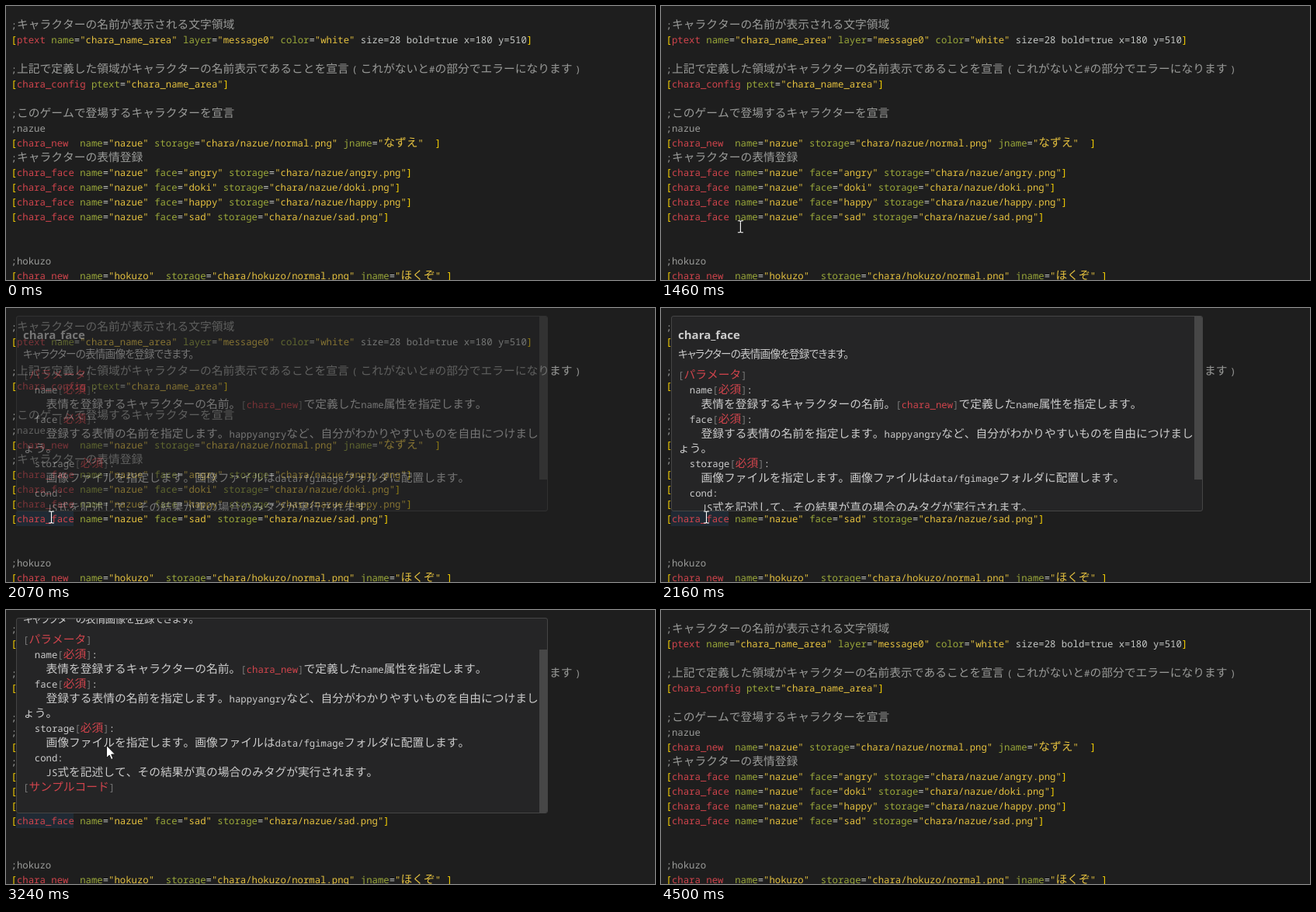
An HTML page that plays this animation: 836 px wide and 353 px high, repeating every 4950 ms.

```html
<!DOCTYPE html>
<html lang="ja">
<head>
<meta charset="utf-8">
<style>
html, body { margin: 0; width: 100%; height: 100%; overflow: hidden; background: #1e1e1e; }
#stage { position: absolute; width: 836px; height: 353px; overflow: hidden; color: #c5c8c6; }
.mono { font: 14.76px/19px "Noto Sans Mono CJK JP", "Noto Sans CJK JP", monospace; text-rendering: geometricPrecision; font-variant-ligatures: none; }
.mono div { height: 19px; white-space: pre; }
.latin { font: 12.3px/1 "Noto Sans Mono", monospace; }
.paren { display: inline-block; width: 14.76px; text-align: center; }
#code { position: absolute; left: 6.6px; top: 14px; }
#mark { position: absolute; left: 13px; top: 262px; width: 74px; height: 19px; background: #202a34; }
#hover { position: absolute; left: 13px; top: 10px; width: 683px; height: 250px; overflow: hidden; background: #252526; border: 1px solid #454545; border-radius: 3px; color: #ccc; }
#doc { position: absolute; left: 8px; top: 0; }
#title, #lead { position: absolute; white-space: nowrap; line-height: 20px; }
#title { top: 13px; font: bold 15px/20px "Open Sans", sans-serif; }
#lead { top: 37px; font: 13.6px/20px "Noto Sans CJK JP", sans-serif; font-feature-settings: "palt"; letter-spacing: -.8px; }
#params { position: absolute; top: 65px; }
#thumb { position: absolute; right: 0; top: 0; width: 10px; height: 210px; background: #474747; }
#arrow, #beam { position: absolute; left: 0; top: 0; overflow: visible; }
.comment { color: #9a9b99; }
.bracket { color: #ffd700; }
.tag { color: #d0444c; }
.attr { color: #9aa83a; }
.string { color: #e5c13f; }
.dim { color: #777; }
</style>
</head>
<body>
<div id="stage">
  <div id="mark"></div>
  <div id="code" class="mono"></div>
  <div id="hover">
    <div id="doc">
      <div id="title">chara_face</div>
      <div id="lead">キャラクターの表情画像を登録できます。</div>
      <div id="params" class="mono"></div>
    </div>
    <div id="thumb"></div>
  </div>
  <svg id="beam" width="9" height="17"><path d="M-3.5 -7.5H-1L0 -6.5L1 -7.5H3.5M0 -6.5V6.5M-3.5 7.5H-1L0 6.5L1 7.5H3.5" fill="none" stroke="#fff" stroke-width="1.1"/></svg>
  <svg id="arrow" width="12" height="20"><path d="M.5 .5V16.5L4.2 13L6.6 18.5L9 17.5L6.7 12H11.5Z" fill="#fff" stroke="#111" stroke-width=".9"/></svg>
</div>
<script>
const LOOP = 4950;
const $ = id => document.getElementById(id);

const code = `;キャラクターの名前が表示される文字領域
[ptext name="chara_name_area" layer="message0" color="white" size=28 bold=true x=180 y=510]

;上記で定義した領域がキャラクターの名前表示であることを宣言（これがないと#の部分でエラーになります）
[chara_config ptext="chara_name_area"]

;このゲームで登場するキャラクターを宣言
;nazue
[chara_new  name="nazue" storage="chara/nazue/normal.png" jname="なずえ"  ]
;キャラクターの表情登録
[chara_face name="nazue" face="angry" storage="chara/nazue/angry.png"]
[chara_face name="nazue" face="doki" storage="chara/nazue/doki.png"]
[chara_face name="nazue" face="happy" storage="chara/nazue/happy.png"]
[chara_face name="nazue" face="sad" storage="chara/nazue/sad.png"]


;hokuzo
[chara_new  name="hokuzo"  storage="chara/hokuzo/normal.png" jname="ほくぞ" ]`;

const params = `[パラメータ]
  name[必須]:
    表情を登録するキャラクターの名前。[chara_new]で定義したname属性を指定します。
  face[必須]:
    登録する表情の名前を指定します。happyangryなど、自分がわかりやすいものを自由につけまし
ょう。
  storage[必須]:
    画像ファイルを指定します。画像ファイルはdata/fgimageフォルダに配置します。
  cond:
    JS式を記述して、その結果が真の場合のみタグが実行されます。
[サンプルコード]`;

const codeRules = [["comment", /^;.*/], ["tag", /(?<=\[)\w+/], ["bracket", /[\[\]]/], ["string", /"[^"]*"/], ["attr", /\w+(?==")/]];
const docRules = [["tag", /(?<=\[)[^\]]+/], ["dim", /[\[\]]/]];

function addSpan(parent, className, text = "") {
  const span = parent.appendChild(document.createElement("span"));
  span.className = className;
  span.textContent = text;
  return span;
}

// Half-width runs use their own face; wide parentheses sit centred in a full cell.
function addText(parent, text) {
  for (const [part] of text.matchAll(/[ -~]+|[（）]|[^ -~（）]+/g)) {
    if (part === "（") addSpan(parent, "latin paren", "(");
    else if (part === "）") addSpan(parent, "latin paren", ")");
    else if (/[ -~]/.test(part)) addSpan(parent, "latin", part);
    else parent.append(part);
  }
}

function fill(box, text, rules) {
  const pattern = new RegExp(rules.map(([name, re]) => `(?<${name}>${re.source})`).join("|"), "g");
  for (const line of text.split("\n")) {
    const row = box.appendChild(document.createElement("div"));
    let end = 0;
    for (const m of line.matchAll(pattern)) {
      addText(row, line.slice(end, m.index));
      const kind = Object.keys(m.groups).find(k => m.groups[k] !== undefined);
      addText(addSpan(row, kind), m[0]);
      end = m.index + m[0].length;
    }
    addText(row, line.slice(end));
  }
}

// Pointer strokes: first step, last step, number of steps, end point.
const strokes = [
  { from: 120, to: 370, steps: 4, x: 557.5, y: 309 },
  { from: 590, to: 920, steps: 5, x: 140, y: 305 },
  { from: 1150, to: 1300, steps: 3, x: 107.5, y: 286 },
  { from: 1460, to: 1760, steps: 5, x: 58.5, y: 269.5 },
  { from: 2540, to: 2860, steps: 5, x: 129, y: 174 },
  { from: 4100, to: 4250, steps: 3, x: 655, y: 247 },
  { from: 4400, to: 4400, steps: 1, x: 657, y: 298 }
];

function pointer(t) {
  let x = 833, y = 346;
  for (const s of strokes) {
    if (t < s.from) break;
    const gap = (s.to - s.from) / Math.max(1, s.steps - 1);
    const step = gap ? Math.min(s.steps, Math.floor((t - s.from + 5) / gap) + 1) : 1;
    const p = step / s.steps;
    const eased = p * p * (3 - 2 * p);
    x += (s.x - x) * eased;
    y += (s.y - y) * eased;
    if (step < s.steps) break;
  }
  return { x, y };
}

function draw(t) {
  const { x, y } = pointer(t);
  const shown = t >= 120 && t < 4500;
  const isArrow = t >= 2540 && (y < 262 || t >= 4100);
  const place = (el, on) => {
    el.style.display = on ? "block" : "none";
    el.style.transform = `translate(${x}px, ${y}px)`;
  };
  place($("arrow"), shown && isArrow);
  place($("beam"), shown && !isArrow);

  $("mark").style.display = t >= 1990 && t < 4500 ? "block" : "none";
  $("hover").style.display = t >= 2070 && t < 4500 ? "block" : "none";
  $("hover").style.opacity = t < 2160 ? .5 : 1;
  const scrolled = t >= 3240;
  $("doc").style.top = scrolled ? "-48px" : "0";
  $("thumb").style.top = scrolled ? "40px" : "0";
}

fill($("code"), code, codeRules);
fill($("params"), params, docRules);
const start = performance.now();
function tick() {
  draw((performance.now() - start) % LOOP);
  requestAnimationFrame(tick);
}
tick();
</script>
</body>
</html>
```
